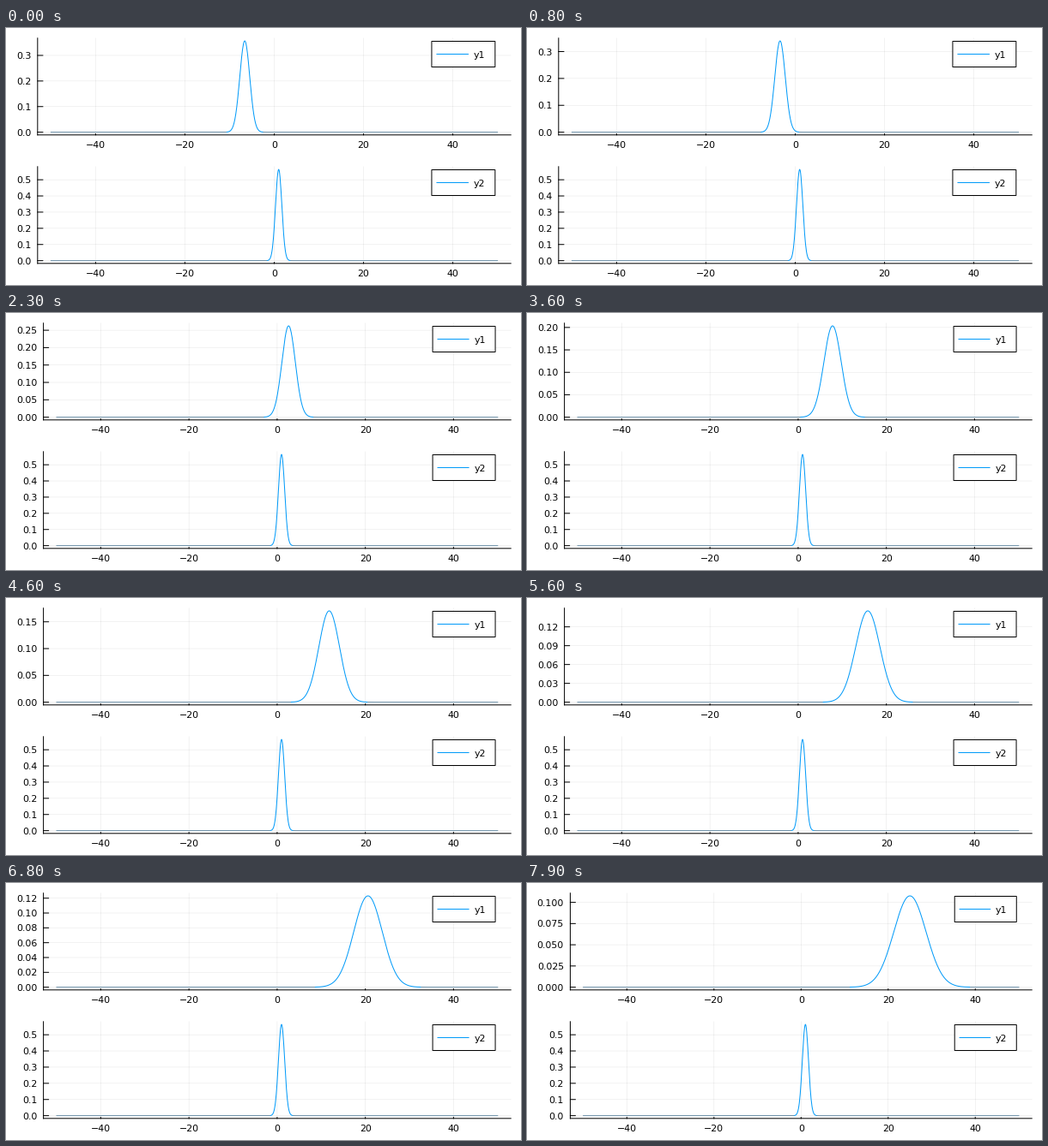
Recreate the animation shown at these times as a matplotlib script. Size 600 by 300 pixels, loop 8 s.

```python
import numpy as np
import matplotlib.pyplot as plt
from matplotlib.animation import FuncAnimation
from matplotlib.patches import Rectangle

W, H, DPI = 600, 300, 100
FRAMES, INTERVAL = 80, 100
PX = 72 / DPI                      # one pixel in points
RIGHT, PANEL_H, PAD = 588.19, 113.0, 0.03
TOPS = (11.81, 161.81)
BLUE, FLAT = "#009AF9", "#6A8EA6"
# tick step mantissas with their niceness
STEPS = ((1, 1.0), (5, 0.9), (2.5, 0.5), (2, 0.7), (3, 0.2))

plt.rcParams["font.family"] = "DejaVu Sans"
fig = plt.figure(figsize=(W / DPI, H / DPI), dpi=DPI, facecolor="white")
ax = fig.add_axes([0, 0, 1, 1])
grid_x = np.linspace(-50, 50, 1001)


def density(center, var):
    return np.exp(-(grid_x - center) ** 2 / (2 * var)) / np.sqrt(2 * np.pi * var)


def choose_ticks(peak):
    """Best scored tick step for an axis running from 0 to the padded peak."""
    top, span = peak * (1 + PAD), peak * (1 + 2 * PAD)
    options = []
    for power in (-2, -1):
        for mantissa, nice in STEPS:
            step = mantissa * 10.0 ** power
            n = int(top / step + 1e-9) + 1
            if 4 <= n <= 8:
                granularity = 1 - abs(n - 5) / 5
                coverage = 1.5 * span / ((n - 1) * step)
                score = granularity / 4 + coverage / 3 + nice / 4
                options.append((round(score, 9), step, n))
    _, step, n = max(options, key=lambda o: o[0])
    digits = next(d for d in (1, 2, 3) if abs(round(step, d) - step) < 1e-9)
    return step * np.arange(n), digits


def line(xs, ys, color="black", width=1.0, **kw):
    ax.plot(xs, ys, color=color, lw=width * PX, snap=False, **kw)


def label(x, y, text, ha):
    ax.text(x, y + 4, text, ha=ha, va="baseline", fontsize=11 * PX)


def panel(top, left, values, ticks, digits, name):
    width, bottom = RIGHT - left, top + PANEL_H
    peak = values.max()
    scale = PANEL_H / (peak * (1 + 2 * PAD))
    zero = bottom - PAD * peak * scale

    def to_x(v):
        return left + (v + 53) / 106 * width

    def to_y(v):
        return zero - v * scale

    x_ticks = range(-40, 41, 20)
    for v in x_ticks:
        line([to_x(v)] * 2, [top, bottom], width=0.5, alpha=0.1)
    for v in ticks:
        line([left, RIGHT], [to_y(v)] * 2, width=0.5, alpha=0.1)

    line([left, RIGHT], [bottom, bottom])
    line([left, left], [top, bottom])
    for v in x_ticks:
        line([to_x(v)] * 2, [bottom, bottom - 0.011 * PANEL_H])
        label(to_x(v), bottom + 11, str(v).replace("-", "\u2212"), "center")
    for v in ticks:
        line([left, left + 0.011 * width], [to_y(v)] * 2)
        label(left - 7.4, to_y(v), f"{v:.{digits}f}", "right")

    xs, ys = to_x(grid_x), to_y(values)
    flat = values * scale < 0.1
    line(xs, np.where(flat, np.nan, ys), BLUE)
    line(xs, np.where(flat, ys, np.nan), FLAT)

    # legend, placed as fractions of the panel width
    x0, x1, s0, s1, tx = (RIGHT - f * width
                          for f in (0.1673, 0.0333, 0.1564, 0.0902, 0.0785))
    y0 = top + 3.7
    ax.add_patch(Rectangle((x0, y0), x1 - x0, 30, fc="white", ec="black",
                           lw=PX, snap=False, zorder=3))
    line([s0, s1], [y0 + 15] * 2, BLUE, zorder=4)
    label(tx, y0 + 15.2, name, "left")


def draw(i):
    ax.clear()
    ax.set(xlim=(0, W), ylim=(H, 0))
    ax.axis("off")
    t = i / 10
    moving = density(-6.6 + 4 * t, 1.25 + 0.2 * t * t)   # spreading free packet
    still = density(1, 0.5)
    ticks, digits = choose_ticks(moving.max())
    left = 36.8 + 6.8 * (digits - 1)
    panel(TOPS[0], left, moving, ticks, digits, "y1")
    panel(TOPS[1], left, still, *choose_ticks(still.max()), "y2")
    return []


anim = FuncAnimation(fig, draw, frames=FRAMES, interval=INTERVAL,
                     init_func=lambda: [], repeat=True, repeat_delay=0)
plt.show()
```
